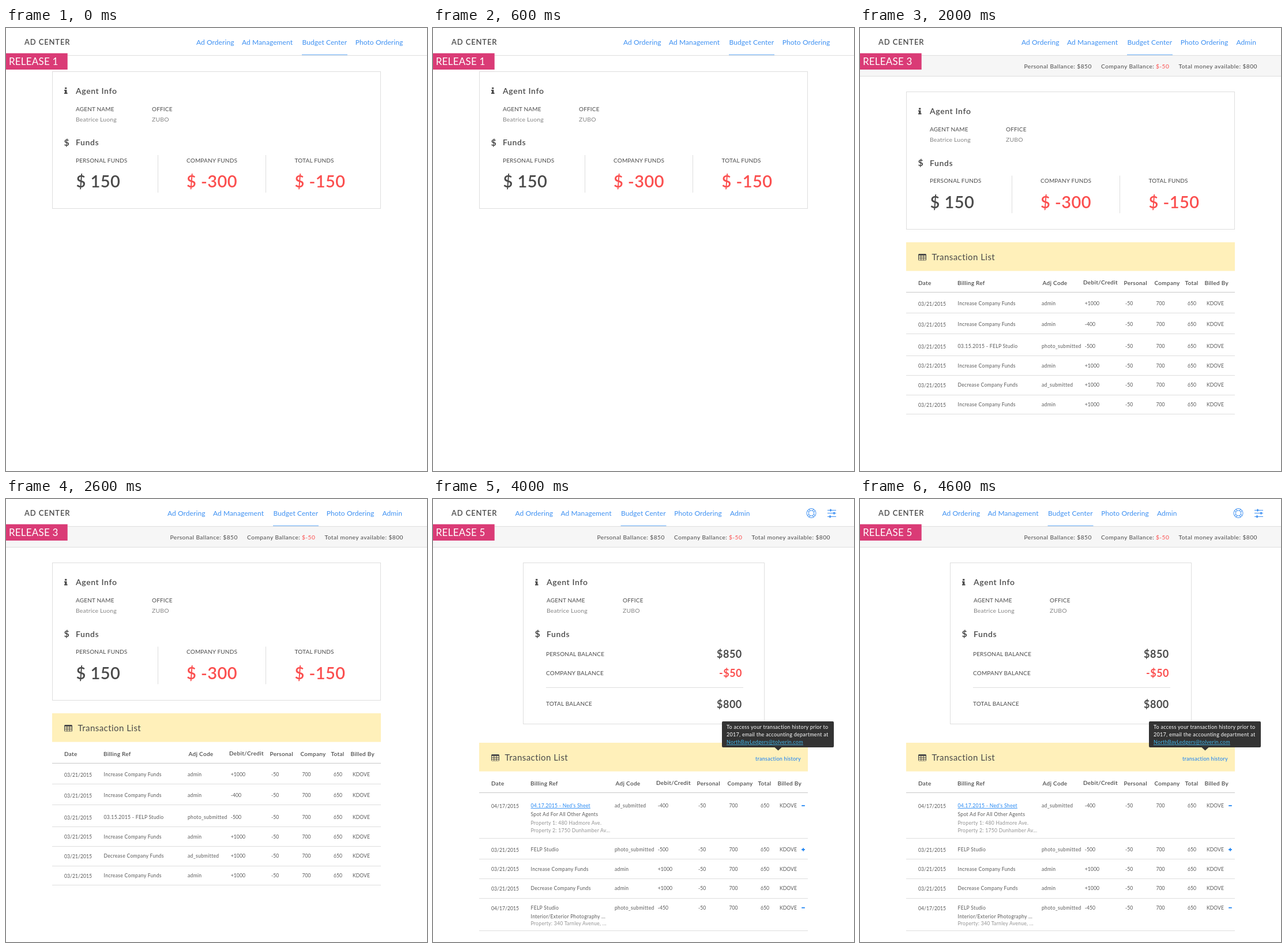
These frames come from a looping animation (730x767 px, 5000 ms). An HTML page:

```html
<!DOCTYPE html>
<html lang="en">
<head>
<meta charset="utf-8">
<title>Ad Center releases</title>
<style>
html, body { margin: 0; width: 100%; height: 100%; overflow: hidden; background: #fff; }
svg { display: block; }
text { font-family: Lato, "Open Sans", sans-serif; fill: #4a4a4a; white-space: pre; }
.logo { font-size: 13px; font-weight: 600; letter-spacing: .87px; }
.nav { font-size: 12px; letter-spacing: .08px; fill: #3d90f2; }
.tag { font-size: 17px; letter-spacing: .2px; fill: #fff; }
.head { font-size: 14px; font-weight: 600; letter-spacing: .65px; }
.label { font-size: 10px; letter-spacing: .17px; }
.value { font-size: 10.4px; letter-spacing: .2px; fill: #858585; }
.icon { font-size: 16px; font-weight: 700; }
.big { font-size: 29px; font-weight: 600; letter-spacing: .45px; }
.sum { font-size: 18px; font-weight: 700; letter-spacing: .5px; }
.title { font-size: 15px; letter-spacing: .46px; }
.th { font-size: 10px; font-weight: 600; letter-spacing: .3px; }
.td { font-size: 8.6px; letter-spacing: .29px; fill: #5a5a5a; }
.num { font-size: 8.6px; letter-spacing: .05px; fill: #5a5a5a; }
.bar { font-size: 10.2px; letter-spacing: .45px; }
.tip { font-size: 9px; letter-spacing: .28px; fill: #fff; }
.more { font-size: 9px; font-weight: 500; letter-spacing: .25px; fill: #2186f3; }
.dim { fill: #929292; }
.red { fill: #fb4f4f; }
.link { fill: #2186f3; text-decoration: underline; }
.mail { fill: #42b4e6; text-decoration: underline; }
.blue { fill: none; stroke: #3d90f2; }
.sign { fill: none; stroke: #2186f3; stroke-width: 1.8; }
</style>
</head>
<body>
<svg id="stage" width="730" height="767" viewBox="0 0 730 767"></svg>
<script>
const DARK = '#4a4a4a', RULE = '#dedede', YELLOW = '#fff0ba';
const SECOND = 1000;

const text = (x, y, cls, s) => `<text x="${x}" y="${y}" class="${cls}">${s}</text>`;
const rect = (x, y, w, h, fill, more = '') =>
  `<rect x="${x}" y="${y}" width="${w}" height="${h}" fill="${fill}" ${more}/>`;
const path = (d, attrs) => `<path d="${d}" ${attrs}/>`;
const shift = (x, y, s) => `<g transform="translate(${x} ${y})">${s}</g>`;
const texts = (xs, y, cls, words) => words.map((s, i) => text(xs[i], y, cls, s)).join('');

function header(release, dx, links) {
  const names = ['Ad Ordering', 'Ad Management', 'Budget Center', 'Photo Ordering', 'Admin'];
  const xs = [330, 409, 513.5, 605.7, 702.5];
  return rect(0, 47, 730, 1, RULE) +
    text(32, 29, 'logo', 'AD CENTER') +
    shift(dx, 0, texts(xs, 29, 'nav', names.slice(0, links)) + rect(513, 45.7, 79, 1.3, '#86bdf8')) +
    rect(0, 43.7, 106.7, 28.3, '#da3b76') +
    text(5, 63.7, 'tag', 'RELEASE ' + release);
}

const balanceBar = rect(0, 48, 730, 35, '#f6f6f6') + rect(0, 83, 730, 1, RULE) +
  text(284.5, 70, 'bar', 'Personal Ballance: $850') +
  text(418, 70, 'bar', 'Company Ballance:') +
  text(513, 70, 'bar red', '$-50') +
  text(552.5, 70, 'bar', 'Total money available: $800');

const spokes = [45, 135, 225, 315].map(a =>
  path('M4.3-1.6H8M4.3 1.6H8', `transform="rotate(${a})"`)).join('');
const tools = `<g class="blue"><g transform="translate(656 24.5)">
  <circle r="8"/><circle r="4.6"/>${spokes}</g>` +
  path('M684 19.5h15M684 24.5h15M684 30.5h15', '') +
  path('M689.5 17.5v4M695.5 22.5v4M688.5 28.5v4', 'stroke-width="2.4"') + '</g>';

const box = (x, y, w, h) => rect(x, y, w, h, '#fff', `stroke="${RULE}"`);

const agent = path('M102 103h3.4v2.6h-3.4zM101 107h4.4v5h1.1v2h-5.5v-2h1.1v-3h-1.1z', `fill="${DARK}"`) +
  text(121, 113.5, 'head', 'Agent Info') +
  text(121, 143.5, 'label', 'AGENT NAME') + text(253, 143.5, 'label', 'OFFICE') +
  text(121, 161.5, 'value', 'Beatrice Luong') + text(253, 161.5, 'value', 'ZUBO') +
  text(100.6, 203.6, 'icon', '$') + text(121, 203, 'head', 'Funds');

const funds = texts([121, 313, 500.5], 232.8, 'label', ['PERSONAL FUNDS', 'COMPANY FUNDS', 'TOTAL FUNDS']) +
  text(121.5, 276.3, 'big', '$ 150') +
  texts([313, 500.5], 276.3, 'big red', ['$ -300', '$ -150']) +
  rect(263, 220, 1, 65, RULE) + rect(450, 220, 1, 65, RULE);

const wideCard = box(80.5, 75.5, 569, 237) + agent + funds;
const lowCard = box(80.5, 110.5, 569, 238) + shift(0, 35.6, agent + funds);

const balances = [['PERSONAL', 272, '$850', 492, ''], ['COMPANY', 305, '-$50', 496, ' red'], ['TOTAL', 358.3, '$800', 492, '']];
const narrowCard = box(156.5, 110.5, 418, 279) + shift(76, 35.6, agent) + rect(196, 326, 342, 1, RULE) +
  balances.map(([name, y, sum, x, tone]) =>
    text(196, y, 'label', name + ' BALANCE') + text(x, y + 3.4, 'sum' + tone, sum)).join('');

function gridIcon() {
  let cells = '';
  for (let i = 0; i < 9; i++)
    cells += rect(102 + i % 3 * 4.3, 23 + Math.floor(i / 3) * 2.9, 3.3, 2, YELLOW);
  return rect(101, 20, 14, 11.6, DARK, 'rx="1.6"') + cells;
}

const tooltip = rect(501, -37, 194, 45, '#333', 'rx="2"') + path('M592.5 8h12l-6 5.5z', 'fill="#333"') +
  text(509, -23.7, 'tip', 'To access your transaction history prior to') +
  text(509, -10.8, 'tip', '2017, email the accounting department at') +
  text(509, 2.2, 'tip mail', 'NorthBayLedgers@tolverin.com') +
  text(559, 30.6, 'more', 'transaction history');

const slim = {
  head: [101, 199.5, 356.5, 432.5, 491.5, 556, 597.5],
  cell: [101, 199.5, 0, 356.5, 432.5, 492, 556, 597.5]
};
const full = {
  head: [101, 169, 387, 457.5, 510.5, 563.5, 597.5], code: 316.5,
  cell: [101, 169.5, 315, 389.8, 460, 513.5, 568, 601]
};

function tableRow(r, y, cols) {
  const [date, ref, code, ...nums] = cols.cell;
  const base = y + r.pad;
  const dated = /^\d/.test(r.ref) && r.sign;
  let out = text(date, base + .8, 'num', r.date || '03/21/2015') +
    text(ref, base, dated ? 'td link' : 'td', r.ref) +
    (cols.code ? text(code, base, 'td', r.code) : '') +
    texts(nums, base, 'num', [r.debit, '-50', '700', '650', 'KDOVE']) +
    (r.sub || []).map((s, i) => text(ref, base + [15, r.sub.length > 2 ? 30 : 27, 43][i], i ? 'td dim' : 'td', s)).join('');
  if (r.sign) {
    const x = r.signX || 642, mid = base - 3;
    out += path(`M${x - 2.8} ${mid}h5.6` + (r.sign === '+' ? `M${x} ${mid - 2.8}v5.6` : ''), 'class="sign"');
  }
  return out + rect(80, y + r.h, 570, 1, RULE);
}

function table(top, rows, cols, tip = '') {
  const names = ['Date', 'Billing Ref', 'Debit/Credit', 'Personal', 'Company', 'Total', 'Billed By'];
  let y = 86;
  let out = rect(80, 0, 570, 49.6, YELLOW) + gridIcon() + text(124.5, 31.3, 'title', 'Transaction List') +
    names.map((s, i) => text(cols.head[i], i === 2 ? 73 : 73.5, 'th', s)).join('') +
    (cols.code ? text(cols.code, 74.3, 'th', 'Adj Code') : '') + rect(80, y, 570, 1, '#c8c8c8');
  for (const r of rows) {
    out += tableRow(r, y, cols);
    y += r.h;
  }
  return shift(0, top, out + tip);
}

const row = (h, pad, ref, code, debit, more) => ({ h, pad, ref, code, debit, ...more });
const UP = 'Increase Company Funds', DOWN = 'Decrease Company Funds', SHOT = 'FELP Studio';

const plainRows = [
  row(36, 23, UP, 'admin', '+1000'),
  row(36, 23, UP, 'admin', '-400'),
  row(38, 25, '03.15.2015 - ' + SHOT, 'photo_submitted', '-500'),
  row(34, 20.5, UP, 'admin', '+1000'),
  row(34, 20.3, DOWN, 'ad_submitted', '+1000'),
  row(33, 20, UP, 'admin', '+1000')
];

const later = '04/17/2015';
const richRows = [
  row(36, 23, "03.21.2015 - Ned's Sheet", 'ad_submitted', '-550', { sign: '+', signX: 645 }),
  row(76, 23.3, "04.17.2015 - Ned's Sheet", 'ad_submitted', '-400', {
    date: later, sign: '-',
    sub: ['Spot Ad For All Other Agents', 'Property 1: 480 Hadmore Ave.', 'Property 2: 1750 Dunhamber Av...']
  }),
  row(36, 23, SHOT, 'photo_submitted', '-500', { sign: '+' }),
  row(34, 20.5, UP, 'admin', '+1000'),
  row(34, 20, DOWN, 'admin', '+1000'),
  row(56, 19.7, SHOT, 'photo_submitted', '-450', {
    date: later, sign: '-',
    sub: ['Interior/Exterior Photography ...', 'Property: 340 Tarnley Avenue, ...']
  })
];
const lastRows = richRows.slice(1);
lastRows[0] = { ...lastRows[0], h: 79, pad: 26 };

const scenes = [
  header(1, 0, 4) + wideCard,
  header(2, -50, 5) + wideCard + table(335, plainRows, slim),
  balanceBar + header(3, -50, 5) + lowCard + table(371, plainRows, full),
  balanceBar + header(4, -187.5, 5) + tools + lowCard + table(377, richRows, full, tooltip),
  balanceBar + header(5, -187.5, 5) + tools + narrowCard + table(422, lastRows, full, tooltip)
];

const stage = document.getElementById('stage');
stage.innerHTML = scenes.map(s => `<g display="none">${s}</g>`).join('');
const layers = [...stage.children];

function draw() {
  const now = Math.floor(performance.now() / SECOND) % layers.length;
  layers.forEach((g, i) => g.setAttribute('display', i === now ? 'inline' : 'none'));
  requestAnimationFrame(draw);
}
draw();
</script>
</body>
</html>
```
